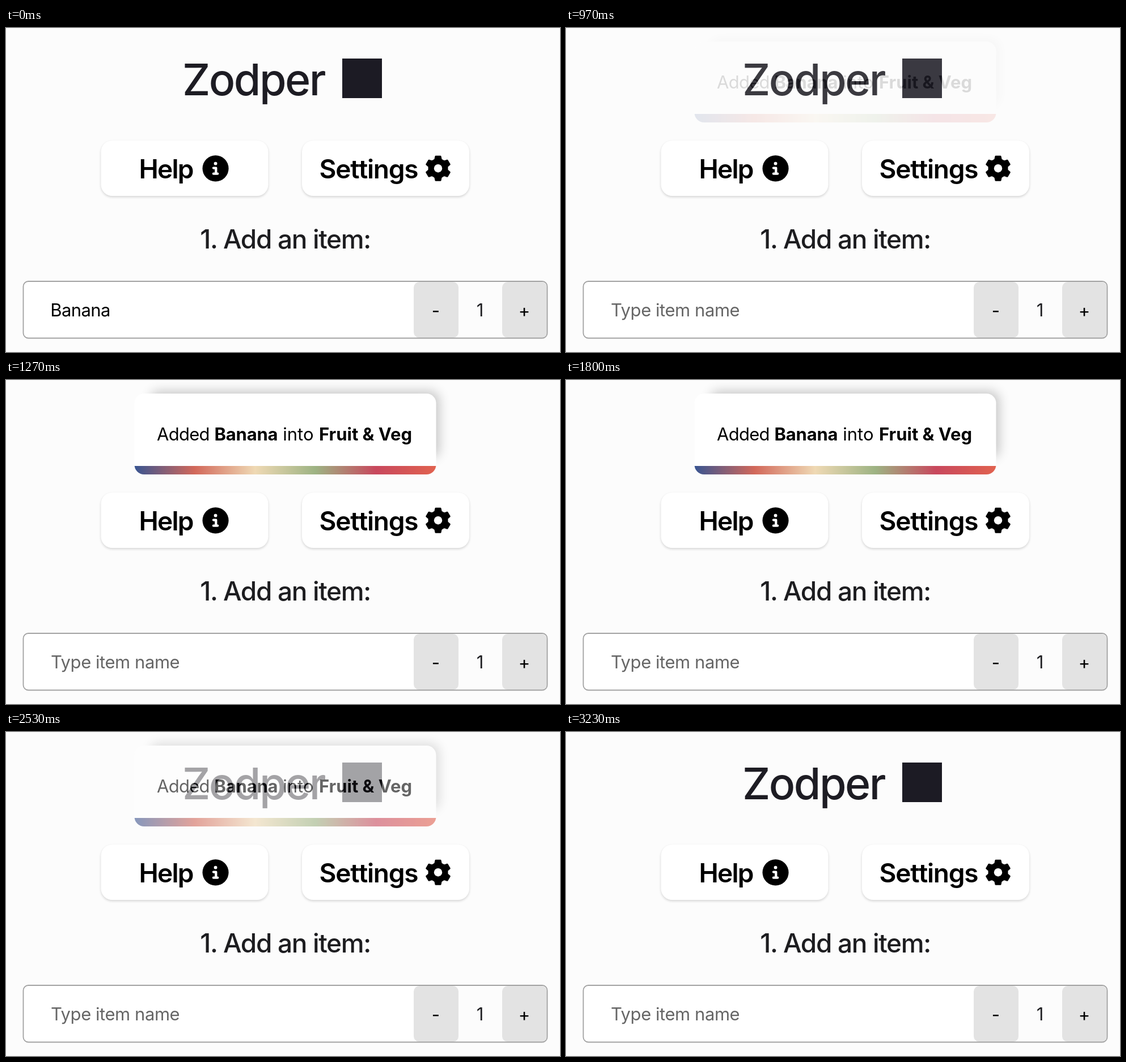
These frames come from a looping animation (977 px wide and 573 px high, 3360 ms). An HTML page:

```html
<!DOCTYPE html>
<html lang="en">
<head>
<meta charset="utf-8">
<title>Shopping list</title>
<style>
  html, body { margin: 0; width: 100%; height: 100%; overflow: hidden; background: #fcfcfc; }
  svg { display: block; width: 977px; height: 573px; }
  text { font-family: Inter, Roboto, sans-serif; font-size: 31px; font-optical-sizing: none; }
  .title { font-size: 77px; font-weight: 550; letter-spacing: -2.5px; fill: #1d1c23; }
  .label { font-size: 46px; font-weight: 600; letter-spacing: -1.2px; }
  .heading { font-size: 46px; font-weight: 500; letter-spacing: -1.35px; fill: #1d1d20; }
  .mid { text-anchor: middle; }
  .bold { font-weight: 700; }
</style>
</head>
<body>
<svg viewBox="0 0 977 573">
  <defs>
    <linearGradient id="stripe">
      <stop offset="0" stop-color="#385592"/>
      <stop offset=".2" stop-color="#d2685a"/>
      <stop offset=".4" stop-color="#efd9b4"/>
      <stop offset=".6" stop-color="#9db383"/>
      <stop offset=".8" stop-color="#c8485d"/>
      <stop offset="1" stop-color="#e1624f"/>
    </linearGradient>
    <filter id="soft" x="-20%" y="-20%" width="140%" height="140%">
      <feGaussianBlur stdDeviation="2"/>
    </filter>
    <filter id="wide" x="-20%" y="-50%" width="140%" height="200%">
      <feGaussianBlur stdDeviation="10"/>
    </filter>
    <clipPath id="card"><rect x="226.5" y="24" width="532" height="143" rx="17"/></clipPath>
    <g id="button">
      <rect y="2" width="295" height="98" rx="20" opacity=".16" filter="url(#soft)"/>
      <rect width="295" height="98" rx="20" fill="#fff"/>
    </g>
  </defs>

  <rect width="977" height="573" fill="#fcfcfc"/>

  <text class="title" x="311" y="119">Zodper</text>
  <rect x="593" y="54" width="70" height="70" fill="#1c1b24"/>

  <use href="#button" x="167.5" y="199"/>
  <text class="label" x="234.5" y="266" style="letter-spacing: -1.8px">Help</text>
  <g transform="translate(346.5 225.3) scale(.09)">
    <circle cx="256" cy="256" r="256"/>
    <circle cx="256" cy="160" r="32" fill="#fff"/>
    <path d="M216 248H264V360M216 360H296" fill="none" stroke="#fff" stroke-width="48"
      stroke-linecap="round" stroke-linejoin="round"/>
  </g>

  <use href="#button" x="522" y="199"/>
  <text class="label" x="552.5" y="266">Settings</text>
  <g transform="translate(762 248.2)">
    <path id="gear" stroke="#000" stroke-width="3" stroke-linejoin="round"/>
    <circle r="7.2" fill="#fff"/>
  </g>

  <text class="heading mid" x="492.5" y="390">1. Add an item:</text>

  <rect x="30.5" y="448" width="924" height="100.5" rx="9" fill="#fff"/>
  <rect x="790" y="449" width="92" height="99" fill="#fcfcfc"/>
  <rect x="719" y="449" width="79" height="99" rx="10" fill="#e3e3e3"/>
  <rect x="875" y="449" width="79" height="99" rx="10" fill="#e3e3e3"/>
  <rect x="30.5" y="448" width="924" height="100.5" rx="9" fill="none" stroke="#a2a2a2" stroke-width="1.8"/>
  <text id="typed" x="78.3" y="510" letter-spacing="-.6">Banana</text>
  <text id="hint" x="79" y="510" fill="#666" letter-spacing="-.45">Type item name</text>
  <text class="mid" x="758" y="510.5">-</text>
  <text class="mid" x="836" y="510" fill="#1d1d20">1</text>
  <text class="mid" x="914" y="511">+</text>

  <g id="toast">
    <rect x="254" y="20" width="510" height="118" rx="16" opacity=".22" filter="url(#wide)"/>
    <g clip-path="url(#card)">
      <rect x="226" y="24" width="533" height="143" fill="#fff"/>
      <rect x="226" y="152" width="533" height="16" fill="url(#stripe)"/>
    </g>
    <text x="266" y="107" letter-spacing="-.7">Added</text>
    <text class="bold" x="367.5" y="107" letter-spacing="-.2">Banana</text>
    <text x="488.3" y="107">into</text>
    <text class="bold" x="552" y="107">Fruit &amp; Veg</text>
  </g>
</svg>
<script>
  const LOOP = 3360, FADE = 400, SHOW = 876, HIDE = 2355;
  const el = id => document.getElementById(id);
  const typed = el('typed'), hint = el('hint'), toast = el('toast');

  // Six teeth, each a trapezoid given as [degrees from its axis, radius].
  const tooth = [[-25, 16], [-18, 16.6], [-11, 21.4], [11, 21.4], [18, 16.6], [25, 16]];
  const points = [];
  for (let k = 0; k < 6; k++) {
    for (const [deg, r] of tooth) {
      const a = (k * 60 + deg) * Math.PI / 180;
      points.push((r * Math.sin(a)).toFixed(2) + ' ' + (-r * Math.cos(a)).toFixed(2));
    }
  }
  el('gear').setAttribute('d', 'M' + points.join('L') + 'Z');

  function swing(t, start) {
    const p = Math.min(1, Math.max(0, (t - start) / FADE));
    return (1 - Math.cos(p * Math.PI)) / 2;
  }

  // The picture advances thirty times a second, in 30/40/30 ms beats.
  function beat(t) {
    const r = t % 100;
    return t - r + (r < 30 ? 0 : r < 70 ? 30 : 70);
  }

  function draw(ms) {
    const t = beat(ms % LOOP);
    const added = t >= 870;
    typed.setAttribute('visibility', added ? 'hidden' : 'visible');
    hint.setAttribute('visibility', added ? 'visible' : 'hidden');
    toast.setAttribute('opacity', swing(t, SHOW) - swing(t, HIDE));
  }

  let began;
  function tick(now) {
    if (began === undefined) began = now;
    draw(now - began);
    requestAnimationFrame(tick);
  }
  draw(0);
  requestAnimationFrame(tick);
</script>
</body>
</html>
```
